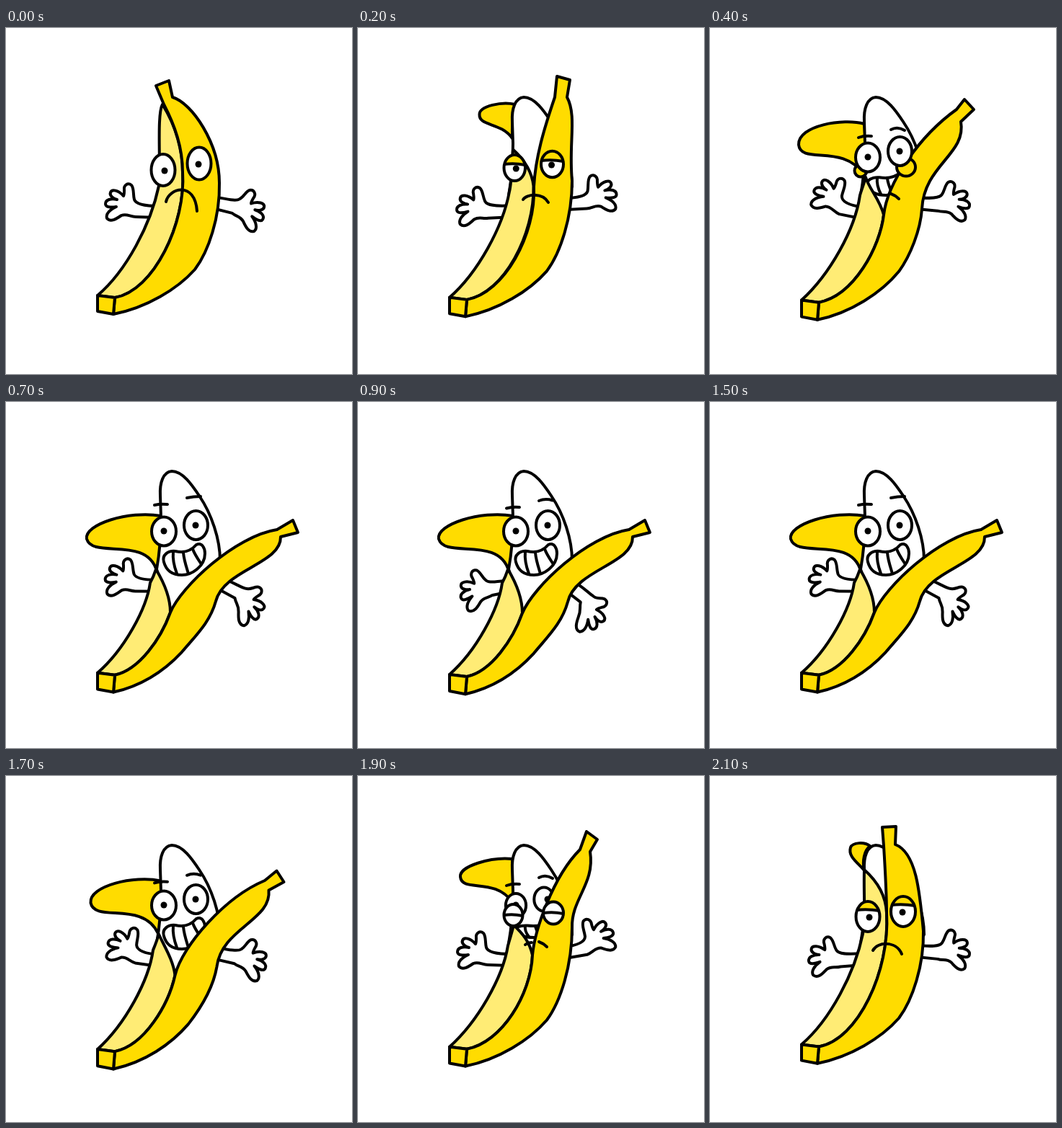
Animation of 480 by 480 pixels, one loop 2.2 s. Source, as an HTML page with a canvas:

```html
<!DOCTYPE html>
<html lang="en">
<head>
<meta charset="utf-8">
<title>Peeling banana</title>
<style>
html, body { margin: 0; width: 100%; height: 100%; overflow: hidden; background: #fff }
canvas { display: block; width: 480px; height: 480px }
</style>
</head>
<body>
<canvas width="480" height="480"></canvas>
<script>
const ctx = document.querySelector('canvas').getContext('2d');
const YELLOW = '#ffdc00', LIGHT = '#ffec75', WHITE = '#fff', BLACK = '#000';
const NUMBER = /-?\d+(\.\d+)?/g;
const PAIR = /(-?[\d.]+),(-?[\d.]+)/g;

// Each shape maps a peel stage (0 closed, 6 open) to its outline.
const rightPeel = {
  0: 'M208,80 L226,73 L231,96 C258,104 296,160 296,215 C297,262 281,310 262,335 C238,362 195,388 149,397 L151,374 C205,365 250,270 245,200 C245,165 234,135 219,106 Z',
  1: 'M239,71 L258,70 L257,95 C286,106 291,160 296,215 C297,262 281,310 262,335 C238,362 195,388 149,397 L151,374 C205,365 250,270 245,190 C245,165 243,130 241,97 Z',
  2: 'M276,67 L294,72 L290,96 C304,122 292,160 297,212 C297,262 281,310 262,335 C238,362 195,388 149,397 L151,374 C203,365 247,285 244,220 C246,180 258,140 273,96 Z',
  3: 'M317,77 L332,88 L322,105 C329,150 296,170 297,210 C297,262 281,310 262,335 C238,362 195,388 149,397 L151,374 C200,365 240,300 242,248 C245,215 270,140 308,102 Z',
  4: 'M353,99 L366,113 L348,130 C356,175 297,190 294,250 C292,278 278,312 262,333 C238,361 195,388 149,397 L151,374 C200,365 236,300 241,258 C246,215 290,150 342,113 Z',
  6: 'M398,164 L405,181 L381,187 C382,225 302,232 291,275 C283,303 264,320 244,343 C220,368 190,388 149,397 L151,374 C185,367 215,325 228,290 C243,255 318,186 376,177 Z'
};
const lightFace = {
  0: 'M217,106 C235,135 245,165 245,200 C250,270 205,365 151,374 L127,371 C167,337 201,272 212,219 C215,190 209,120 217,106 Z',
  1: 'M214,130 C232,146 244,165 245,190 C250,270 205,365 151,374 L127,371 C167,337 201,272 212,219 C216,200 213,160 214,130 Z',
  3: 'M216,207 C228,218 238,230 242,248 C240,300 200,365 151,374 L127,371 C166,337 201,278 208,235 C211,225 214,215 216,207 Z',
  4: 'M216,207 C220,222 236,238 241,258 C236,300 200,365 151,374 L127,371 C166,337 201,278 208,232 C210,225 214,215 216,207 Z',
  6: 'M208,232 C218,248 228,270 228,290 C215,325 185,367 151,374 L127,371 C164,340 195,285 200,250 C204,243 206,238 208,232 Z'
};
const leftPeel = {
  1: 'M222,97 C214,91 198,92 195,99 C191,112 205,120 214,131 C211,118 214,103 222,97 Z',
  3: 'M214,115 C185,112 140,125 142,140 C144,162 190,140 214,175 C216,155 216,135 214,115 Z',
  4: 'M214,133 C185,125 122,135 123,162 C126,190 185,160 213,203 C216,180 216,150 214,133 Z',
  6: 'M215,158 C170,150 108,170 112,190 C120,218 195,185 209,234 C218,210 218,180 215,158 Z'
};
const frown = {
  0: 'M222,241 C226,222 262,212 265,254',
  1: 'M226,242 C232,230 258,228 266,247',
  3: 'M232,234 C236,230 254,228 262,237'
};
// Peel eyes: centre, then radii.
const peelEyes = [
  { 0: '218,197 16.5,22', 1: '219,195 16.5,21', 3: '215.5,193 13,15', 4: '209,198 8.5,8.5' },
  { 0: '268,188 16.5,22.5', 1: '268,188 17,21', 3: '271,190 14,15.5', 4: '272,193 13,12.5' }
];
const base = 'M127,371 L151,374 L149,397 L127,393 Z';
const inner = 'M209,232 C213,210 215,185 215,160 L214,130 C213,112 218,97 230,96 C245,96 258,115 268,130 C285,155 297,190 297,220 L240,295 L228,292 Z';
const mouth = 'M219,222 C216,212 225,206 235,207 C248,210 258,205 264,198 C272,194 276,203 276,210 C276,228 258,240 244,240 C230,240 222,233 219,222 Z';
const teeth = 'M232,208 C231,218 234,230 237,238 M246,209 C247,220 250,228 253,238 M259,204 C262,212 267,219 271,225';
const arm = 'M12,-8 C-10,-8 -20,-11 -22,-17 C-24,-25 -22,-32 -26,-37 C-31,-41 -37,-37 -36,-30 C-36,-25 -36,-23 -37,-22 C-44,-30 -53,-32 -55,-27 C-57,-22 -50,-18 -46,-17 C-54,-19 -62,-17 -62,-11 C-62,-6 -54,-6 -47,-7 C-56,-3 -62,3 -60,9 C-55,15 -47,10 -40,5 C-32,2 -28,7 -20,7 L12,8';

// Values per stage 0 to 7.
const stretch = [0, 1.5, 3, 5, 7, 8.5, 7, 5];
const leftTurn = [0, -12, -8, 0, 18, 12, 5, -2];
const rightTurn = [30, 14, -2, -15, 13, 28, 43, 57];
const browLift = [0, 0, 0, 0, 0, .4, .8, 1];

const warp = (path, move) => path.replace(PAIR, (_, x, y) => move(+x, +y).join());

function blend(shapes, stage) {
  const keys = Object.keys(shapes).map(Number);
  const from = keys.filter(k => k <= stage).pop() ?? keys[0];
  const to = keys.find(k => k > stage) ?? from;
  const k = to > from ? (stage - from) / (to - from) : 0;
  const end = shapes[to].match(NUMBER);
  let i = 0;
  return shapes[from].replace(NUMBER, v => v * (1 - k) + end[i++] * k);
}

function draw(path, fill) {
  const shape = new Path2D(path);
  if (fill) { ctx.fillStyle = fill; ctx.fill(shape); }
  ctx.stroke(shape);
}

function oval(x, y, rx, ry, fill, line = true) {
  ctx.beginPath();
  ctx.ellipse(x, y, rx, ry, 0, 0, 7);
  ctx.fillStyle = fill;
  ctx.fill();
  if (line) ctx.stroke();
}

const pupil = (x, y) => oval(x, y, 4.5, 4.5, BLACK, false);

// Bends the arm so that it stays attached at the shoulder.
function drawArm(x0, y0, side, degrees) {
  draw(warp(arm, (x, y) => {
    const a = degrees * Math.PI / 180 * Math.min(1, Math.hypot(x, y) / 35);
    const c = Math.cos(a), s = Math.sin(a);
    x *= side;
    return [x0 + x * c - y * s, y0 + x * s + y * c];
  }), WHITE);
}

function drawPeelEye(shapes, stage) {
  const [x, y, rx, ry] = blend(shapes, stage).match(NUMBER).map(Number);
  oval(x, y, rx, ry, stage > 3 ? YELLOW : WHITE, false);
  if (stage < 3) pupil(x + (x < 240 ? 2 : -1), y + 1);
  if (stage > 0 && stage < 4) {
    const lid = y - [0, 9, 5, 0][stage];
    ctx.save();
    ctx.beginPath();
    ctx.ellipse(x, y, rx, ry, 0, 0, 7);
    ctx.clip();
    if (stage < 3) {
      ctx.fillStyle = YELLOW;
      ctx.fillRect(x - rx, y - ry, rx * 2, lid - y + ry);
    }
    draw(`M${x - rx},${lid} Q${x},${lid - 2} ${x + rx},${lid + 1}`);
    ctx.restore();
  }
  ctx.beginPath();
  ctx.ellipse(x, y, rx, ry, 0, 0, 7);
  ctx.stroke();
}

function drawInnerEyes(stage) {
  const k = stage < 4 ? .83 : 1;
  oval(219, 179.5, 17 * k, 20 * k, WHITE);
  oval(stage < 4 ? 258 : 263.5, 171, 16.5 * k, 20 * k, WHITE);
  pupil(219, 179);
  pupil(263, 171);
}

function drawInner(stage, lift) {
  draw(inner, WHITE);
  if (stage < 3) return;
  draw(`M206,${152 - 9 * lift} Q214,${149 - 8 * lift} 224,${150 - 8 * lift}`);
  draw(`M251,${141 - 8 * lift} Q260,${136 - 5 * lift} 270,${142 - 11 * lift}`);
  const open = stage < 4 ? .5 : stage < 5 ? .75 : 1;
  const shrink = (x, y) => [x, 208 + (y - 208) * open];
  draw(warp(mouth, shrink), WHITE);
  draw(warp(teeth, shrink));
  if (stage < 4) drawInnerEyes(stage);
}

function render(now) {
  const step = Math.floor(now % 2200 / 100);
  const stage = Math.min(step, 22 - step, 7);
  const dance = stage < 7 ? 0 : (1 - Math.cos((step - 7) * Math.PI / 4)) / 2;
  const reach = Math.max(0, stage - 4) / 3;
  const drop = stretch[stage] + 4.7 * dance;
  const sag = path => warp(path, (x, y) => [x, y + drop * Math.max(0, (y - 230) / 150)]);

  ctx.fillStyle = WHITE;
  ctx.fillRect(0, 0, 480, 480);
  ctx.strokeStyle = BLACK;
  ctx.lineWidth = 4;
  ctx.lineCap = ctx.lineJoin = 'round';

  drawArm(200 + 8 * dance, 255 + 2 * dance, 1, leftTurn[stage] - 46 * dance);
  drawArm(297 + 8 * reach - 11 * dance, 244 + 11 * reach + 7 * dance, -1, rightTurn[stage] + 34 * dance);
  if (stage > 0) {
    draw(blend(leftPeel, stage), YELLOW);
    drawInner(stage, browLift[stage] * (1 - dance));
  }
  draw(sag(blend(lightFace, stage)), LIGHT);
  draw(sag(blend(rightPeel, stage)), YELLOW);
  draw(sag(base), YELLOW);

  if (stage < 5) peelEyes.forEach(eye => drawPeelEye(eye, stage));
  if (stage < 3) draw(blend(frown, stage));
  else if (stage < 5) {
    draw('M251,230 Q257,232 262,237');
    if (stage < 4) draw('M232,234 Q236,231 241,231');
  }
  if (stage > 3) drawInnerEyes(stage);
}

function tick() {
  render(performance.now());
  requestAnimationFrame(tick);
}
tick();
</script>
</body>
</html>
```
